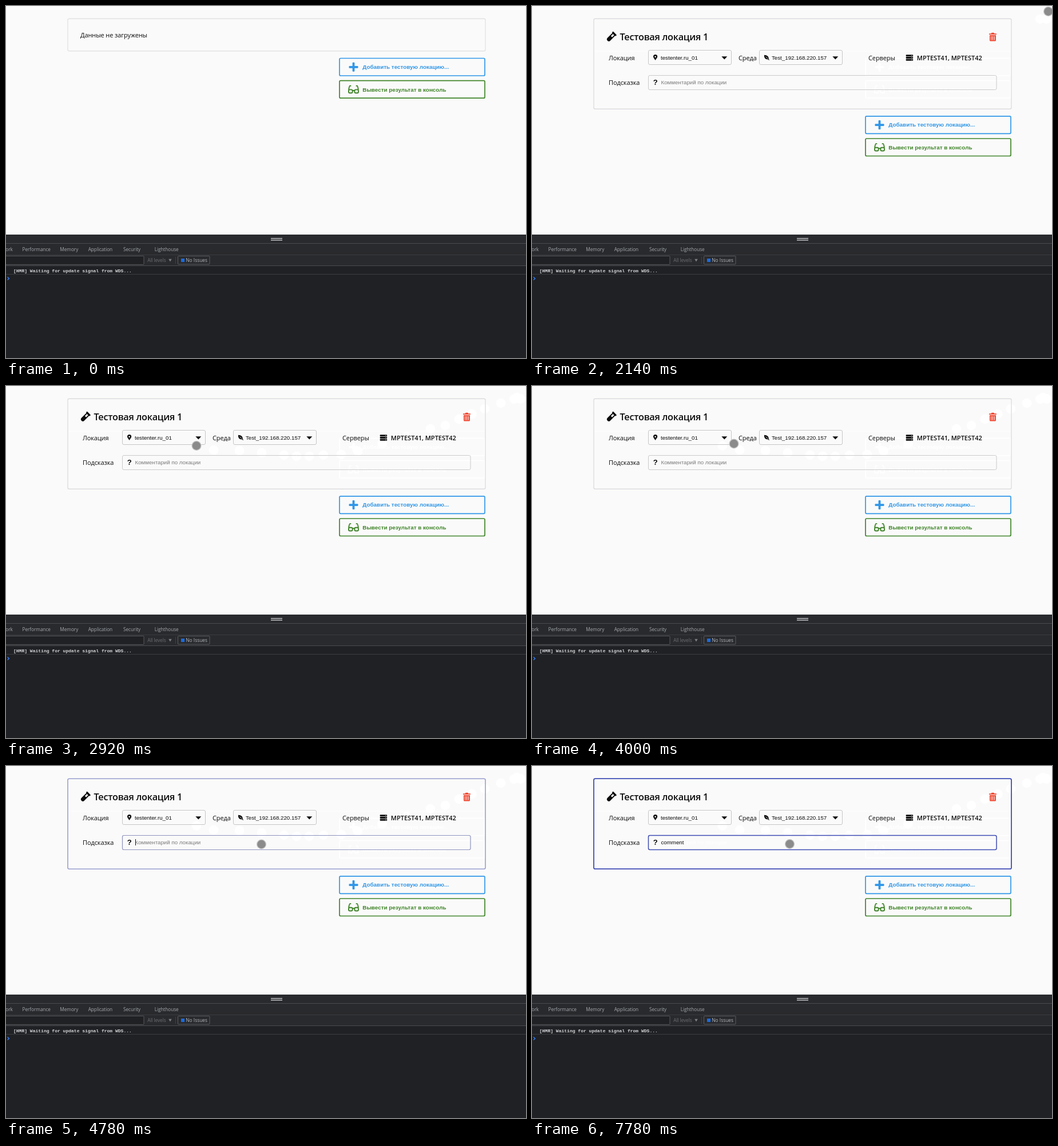
An HTML page with a canvas that plays this animation: 909 by 616 pixels, repeating every 8 s.

```html
<!DOCTYPE html>
<html lang="ru">
<head>
<meta charset="utf-8">
<title>Тестовая локация</title>
<style>
  html, body { margin: 0; width: 100%; height: 100%; overflow: hidden; background: #fafafa; }
  canvas { display: block; width: 100vw; height: 100vh; }
</style>
</head>
<body>
<canvas id="stage" width="909" height="616"></canvas>
<script>
const ctx = document.getElementById('stage').getContext('2d');
const LOOP = 8000, STEP = 30;
const UI = '"Open Sans", "Noto Sans", sans-serif';
const ARIAL = '"Liberation Sans", Arial, sans-serif';
const MONO = '"Liberation Mono", monospace';
const BG = '#fafafa', INK = '#0c0c0c', BLUE = '#3097e8', GREEN = '#3f8428';
const T_CARD = 520, T_FOCUS = 4720, T_TYPE = 5680;

// Pointer path: time, x, y
const path = [
  [100, 899.5, 22.5], [520, 899.5, 22.5], [670, 922, 14], [2110, 922, 14],
  [2140, 902.5, 9.5], [2350, 902.5, 9.5], [2380, 893, 20], [2440, 837, 40],
  [2500, 792, 58], [2530, 768, 69], [2560, 742, 75], [2590, 700, 88],
  [2650, 615, 114], [2680, 586, 120], [2710, 555, 121], [2740, 530, 123],
  [2770, 508, 123], [2800, 486, 121], [2830, 447, 117], [2860, 408, 113],
  [2890, 363, 112], [2920, 333, 104.5], [3160, 343.5, 102.5], [3190, 343.5, 102],
  [3400, 343.5, 98], [3550, 343.5, 98], [3670, 347.5, 99.5], [3970, 347.5, 99.5],
  [4000, 353, 101], [4150, 425, 122], [4270, 492, 135], [4480, 446.5, 137],
  [7750, 446.5, 137], [7780, 450.5, 136.5]
];
const typing = [[5680, 1], [6100, 2], [6220, 3], [6490, 4], [6580, 5], [6940, 6], [7150, 7]];

function pointerAt(t) {
  if (t < path[0][0]) return null;
  let i = path.length - 1;
  while (path[i][0] > t) i--;
  const [t0, x0, y0] = path[i];
  const [t1, x1, y1] = path[i + 1] || path[i];
  const k = t1 > t0 ? (t - t0) / (t1 - t0) : 0;
  return [x0 + (x1 - x0) * k, y0 + (y1 - y0) * k];
}

function text(s, x, y, font, color, spacing = 0, align = 'left') {
  ctx.font = font;
  ctx.fillStyle = color;
  ctx.letterSpacing = spacing + 'px';
  ctx.textAlign = align;
  ctx.fillText(s, x, y);
}
function rect(x, y, w, h, color) {
  ctx.fillStyle = color;
  ctx.fillRect(x, y, w, h);
}
function frame(x, y, w, h, r, color, lw = 1) {
  ctx.beginPath();
  ctx.roundRect(x, y, w, h, r);
  ctx.strokeStyle = color;
  ctx.lineWidth = lw;
  ctx.stroke();
}
function poly(points, color) {
  ctx.beginPath();
  points.forEach(([x, y]) => ctx.lineTo(x, y));
  ctx.closePath();
  ctx.fillStyle = color;
  ctx.fill();
}
function disc(x, y, r, color) {
  ctx.beginPath();
  ctx.arc(x, y, r, 0, 7);
  ctx.fillStyle = color;
  ctx.fill();
}
function at(x, y, draw, angle = 0) {
  ctx.save();
  ctx.translate(x, y);
  ctx.rotate(angle);
  draw();
  ctx.restore();
}
function mix(a, b, k) {
  return `rgb(${a.map((v, i) => Math.round(v + (b[i] - v) * k))})`;
}

function plus(x, y, color) {
  ctx.fillStyle = color;
  ctx.beginPath();
  ctx.roundRect(x - 8, y - 1.9, 16, 3.8, 1);
  ctx.roundRect(x - 1.9, y - 8, 3.8, 16, 1);
  ctx.fill();
}
function glasses(x, y, color) {
  ctx.strokeStyle = color;
  ctx.lineWidth = 1.9;
  ctx.beginPath();
  for (const s of [-1, 1]) {
    ctx.moveTo(x + s * 4.2, y - 6.2);
    ctx.lineTo(x + s * 6.4, y - 6.2);
    ctx.quadraticCurveTo(x + s * 7.4, y - 6, x + s * 8.5, y + 1);
  }
  ctx.roundRect(x - 8.5, y + 0.4, 6.6, 5.8, 2);
  ctx.roundRect(x + 1.9, y + 0.4, 6.6, 5.8, 2);
  ctx.moveTo(x - 2, y + 2);
  ctx.lineTo(x + 2, y + 2);
  ctx.stroke();
}
function buttons(dy, blue = BLUE, green = GREEN) {
  const font = 'bold 9.9px ' + ARIAL;
  frame(583, 91.5 + dy, 254, 30.5, 2, blue, 1.7);
  plus(607.5, 106.8 + dy, blue);
  text('Добавить тестовую локацию...', 623.3, 110 + dy, font, blue);
  frame(583, 130.7 + dy, 254, 30.5, 2, green, 1.7);
  glasses(607.5, 146 + dy, green);
  text('Вывести результат в консоль', 623.3, 149.5 + dy, font, green);
}

function flask() {
  at(138.3, 54.3, () => {
    ctx.fillStyle = INK;
    ctx.beginPath();
    ctx.roundRect(-3.4, -7.5, 6.8, 16.5, [1, 1, 3.4, 3.4]);
    ctx.roundRect(-4.6, -9.4, 9.2, 2.9, 1);
    ctx.fill();
    rect(-1.5, -6, 3, 5, BG);
  }, Math.PI / 4);
}
function trash() {
  const red = '#ef4a34';
  ctx.fillStyle = red;
  ctx.beginPath();
  ctx.roundRect(799, 48.2, 13, 1.9, 0.5);
  ctx.roundRect(803, 46.8, 5, 2, 0.6);
  ctx.roundRect(800, 51, 11, 10.5, [0, 0, 1.5, 1.5]);
  ctx.fill();
  for (const x of [802.2, 805, 807.8]) rect(x, 52.8, 1, 6.8, BG);
}
function pin(x, y) {
  ctx.beginPath();
  ctx.moveTo(x, y + 5);
  ctx.bezierCurveTo(x - 1, y + 2.6, x - 3.6, y + 1, x - 3.6, y - 1.3);
  ctx.arc(x, y - 1.3, 3.6, Math.PI, 0);
  ctx.bezierCurveTo(x + 3.6, y + 1, x + 1, y + 2.6, x, y + 5);
  ctx.fillStyle = INK;
  ctx.fill();
  disc(x, y - 1.3, 1.3, BG);
}
function leaf(x, y) {
  ctx.beginPath();
  ctx.moveTo(x - 4.3, y - 4.3);
  ctx.bezierCurveTo(x + 1, y - 4, x + 4, y - 2, x + 3.4, y + 3.2);
  ctx.bezierCurveTo(x - 2.5, y + 4, x - 4.5, y + 1, x - 4.3, y - 4.3);
  ctx.fillStyle = INK;
  ctx.fill();
  ctx.beginPath();
  ctx.moveTo(x - 1.8, y - 1.5);
  ctx.lineTo(x + 2, y + 2.2);
  ctx.strokeStyle = BG;
  ctx.lineWidth = 0.8;
  ctx.stroke();
  ctx.beginPath();
  ctx.moveTo(x + 2.2, y + 2.4);
  ctx.lineTo(x + 4.4, y + 4.6);
  ctx.strokeStyle = INK;
  ctx.lineWidth = 1.1;
  ctx.stroke();
}
function servers(x, y) {
  for (let i = 0; i < 3; i++) {
    ctx.fillStyle = INK;
    ctx.beginPath();
    ctx.roundRect(x, y + i * 3.8, 12.4, 3, 0.7);
    ctx.fill();
    rect(x + 9.6, y + i * 3.8 + 1, 1.2, 1, BG);
  }
}
function select(x, value) {
  frame(x + 0.5, 77.5, 145, 25, 2.5, '#c6c6c6');
  text(value, x + 22, 93.5, '9.73px ' + ARIAL, INK);
  poly([[x + 128.3, 88.2], [x + 138.3, 88.2], [x + 133.3, 93.4]], INK);
}

function ghosts(t) {
  buttons(0, '#fff', '#fff');
  rect(108, 78.5, 730, 1, '#fff');
  disc(899.5, 22.5, 8.5, '#fff');
  disc(888, 23, 8, '#fff');
  for (let s = 2380; s < t && s <= 2920; s += STEP) disc(...pointerAt(s), 8.3, '#fff');
}

function card(t) {
  const label = '11px ' + UI;
  const k = Math.min(1, Math.max(0, (t - T_FOCUS + STEP) / 300));
  const focus = 1 - (1 - k) ** 1.6;
  const indigo = [63, 76, 180];
  frame(108, 22.2, 730, 158, 2.5, mix([221, 221, 224], indigo, focus), 1.4 + 0.4 * focus);
  flask();
  text('Тестовая локация 1', 153.5, 60.3, '600 16.3px ' + UI, INK, -0.28);
  trash();

  text('Локация', 134, 94.8, label, INK, -0.1);
  select(203, 'testenter.ru_01');
  pin(215.6, 90);
  text('Среда', 361, 94.8, label, INK, -0.1);
  select(397, 'Test_192.168.220.157');
  leaf(410.2, 90);
  text('Серверы', 588, 94.8, label, INK, -0.1);
  servers(653.7, 85.2);
  text('MPTEST41, MPTEST42', 672.8, 94.8, '600 11px ' + UI, INK);

  text('Подсказка', 134, 138.3, label, INK, -0.1);
  frame(203.5, 121.5, 608.5, 25, 2.5, mix([202, 202, 202], indigo, focus), 1 + 0.5 * focus);
  text('?', 211.8, 138.3, 'bold 13px ' + ARIAL, INK);
  hint(t);
}

function hint(t) {
  const font = '9.73px ' + ARIAL;
  let count = 0;
  for (const [time, n] of typing) if (t >= time) count = n;
  const value = 'comment'.slice(0, count);
  text('Комментарий по локации', 225.5, 137.2, font, t < T_TYPE ? '#7b7b7b' : '#fff');
  if (value) {
    ctx.font = font;
    rect(225.5, 126, ctx.measureText(value).width + 1, 15, BG);
    text(value, 225.5, 137.2, font, INK);
  }
  const caretOn = (t >= T_FOCUS && t < 5200) || (t >= T_TYPE && t < 7300);
  if (caretOn) rect(Math.round(225.7 + ctx.measureText(value).width * (count > 0)), 128, 1, 11, '#111');
}

function devtools() {
  rect(0, 400, 909, 216, '#202124');
  rect(0, 400, 909, 55, '#292a2d');
  rect(0, 415, 909, 1, '#494c50');
  rect(0, 435, 909, 1, '#3a3c40');
  rect(0, 454, 909, 1, '#494c50');
  rect(0, 469, 909, 1, '#3a3d41');
  rect(463, 406, 20, 1.4, '#c9cacc');
  rect(463, 409, 20, 1.4, '#c9cacc');

  const font = '8.3px ' + UI, grey = '#a3a8ad';
  text('ork', 11.8, 428.8, font, grey, -0.08, 'right');
  [['Performance', 28.5], ['Memory', 94.3], ['Application', 143.7], ['Security', 205], ['Lighthouse', 259.7]]
    .forEach(([name, x]) => text(name, x, 428.8, font, grey, -0.08));

  rect(0, 437, 241, 16, '#202124');
  frame(-5, 437.5, 246, 15, 1, '#55585c');
  text('All levels', 247.3, 448.3, font, '#6b6f73', -0.08);
  poly([[284.3, 442.8], [289.7, 442.8], [287, 447.6]], '#7c8084');
  rect(296, 439, 1, 12, '#3d4044');
  frame(300.5, 437.5, 55.5, 14.5, 1, '#5a5d61');
  rect(306, 442, 6, 6, '#1a6be0');
  text('No Issues', 314.3, 448.3, '8.4px ' + UI, '#b4b8bc');

  text('[HMR] Waiting for update signal from WDS...', 13, 466, 'bold 8.02px ' + MONO, '#d3d5d7');
  ctx.beginPath();
  ctx.moveTo(2.6, 474.2);
  ctx.lineTo(5.4, 476.9);
  ctx.lineTo(2.6, 479.6);
  ctx.strokeStyle = '#3a7df0';
  ctx.lineWidth = 1.4;
  ctx.stroke();
}

function draw(t) {
  rect(0, 0, 909, 616, BG);
  if (t < T_CARD) {
    frame(108, 22.2, 730, 56.6, 2.5, '#e3e3e3', 1.4);
    text('Данные не загружены', 130, 54.8, '11px ' + UI, INK, -0.1);
    buttons(0);
  } else {
    ghosts(t);
    card(t);
    buttons(101.3);
  }
  devtools();
  const pos = pointerAt(t);
  if (pos) {
    disc(...pos, 8.5, '#c2c2c2');
    disc(...pos, 7.2, '#8b8b8b');
  }
}

// Motion advances on a 30 ms grid starting at 10 ms.
function tick() {
  const t = performance.now() % LOOP;
  draw(Math.max(0, Math.floor((t - 10) / STEP) * STEP + 10));
  requestAnimationFrame(tick);
}
tick();
</script>
</body>
</html>
```
